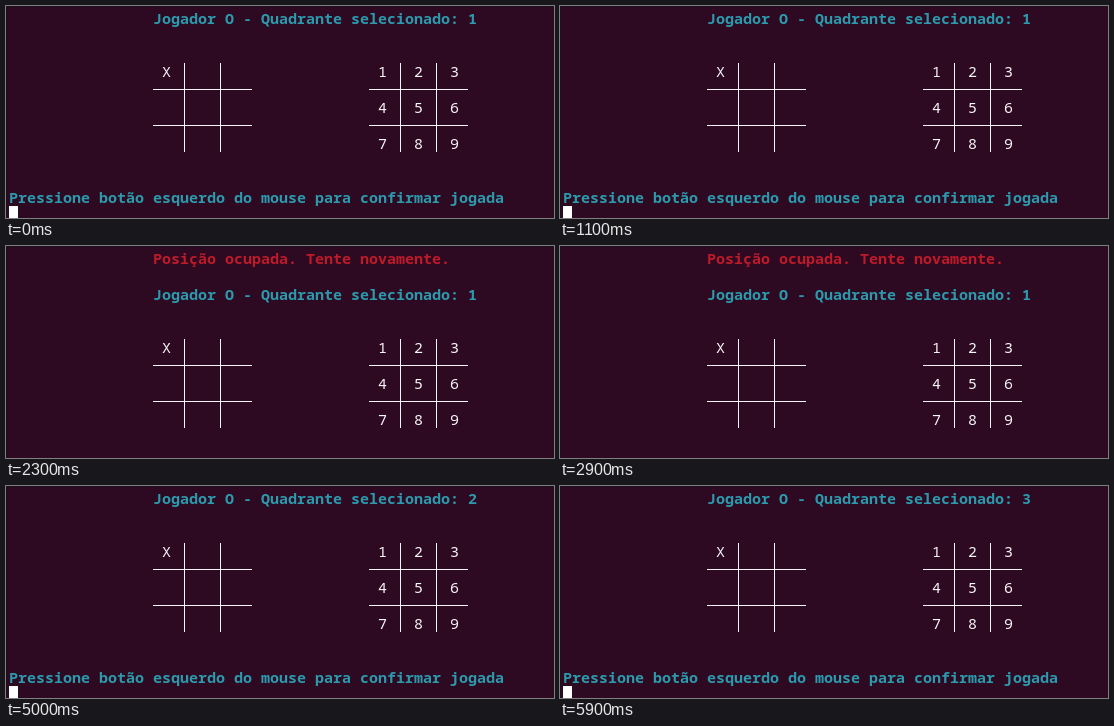
Write an HTML page with a canvas that moves like this. It is 548 by 212 pixels and loops after 6800 ms.

```html
<!DOCTYPE html>
<html lang="pt">
<head>
<meta charset="utf-8">
<title>Jogo da velha</title>
<style>
html, body { margin: 0; width: 100%; height: 100%; overflow: hidden; background: #2d0922; }
canvas { display: block; }
</style>
</head>
<body>
<canvas id="stage" width="548" height="212"></canvas>
<script>
const ctx = document.getElementById('stage').getContext('2d');
const LOOP = 6800, CELL = 9, ROW = 18, LEFT = 3, TOP = 2;
const BASELINE = 18.25, LEADING = 17.9;
const FONT = '15px "Noto Sans Mono", "DejaVu Sans Mono", monospace';
const BG = '#2d0922', EDGE = '#20101d', CYAN = '#2c9aac', RED = '#bd1b29', WHITE = '#f8f6f7';
const BLINK = 600, FIRST_OFF = 500;
const REJECTED = 2300, RETRY = 5000, MOVED = 5600;

const colX = col => LEFT + col * CELL;

function box(color, x, y, w, h) {
  ctx.fillStyle = color;
  ctx.fillRect(x, y, w, h);
}

function print(text, col, row, color, weight) {
  ctx.font = weight + ' ' + FONT;
  ctx.fillStyle = color;
  ctx.fillText(text, colX(col), Math.floor(BASELINE + row * LEADING));
}

function board(col, row, marks) {
  const x = colX(col), y = TOP + row * ROW;
  for (const i of [0, 1]) {
    box(WHITE, x + 31 + i * 36, y + 1, 1, 89);
    box(WHITE, x, y + 27 + i * 36, 99, 1);
  }
  [...marks].forEach((mark, i) =>
    print(mark, col + 1 + (i % 3) * 4, row + 2 * Math.floor(i / 3), WHITE, 500));
}

function cursorOn(t) {
  if (t >= RETRY && t < RETRY + 300) return true;
  return Math.floor((t - FIRST_OFF) / BLINK) % 2 !== 0;
}

function draw(t) {
  const rejected = t >= REJECTED && t < RETRY;
  const head = rejected ? 2 : 0;
  const quadrant = t >= MOVED ? 3 : t >= RETRY ? 2 : 1;

  box(BG, 0, 0, 548, 212);
  box(EDGE, 0, 0, 548, 1);
  box(EDGE, 0, 0, 1, 212);

  if (rejected) print('Posição ocupada. Tente novamente.', 16, 0, RED, 700);
  print('Jogador O - Quadrante selecionado: ' + quadrant, 16, head, CYAN, 700);
  board(16, head + 3, 'X');
  board(40, head + 3, '123456789');

  if (!rejected) {
    print('Pressione botão esquerdo do mouse para confirmar jogada', 0, 10, CYAN, 700);
    if (cursorOn(t)) box('#ffffff', LEFT, 200, CELL, 12);
  }
}

const start = performance.now();
function tick() {
  draw((performance.now() - start) % LOOP);
  requestAnimationFrame(tick);
}
tick();
</script>
</body>
</html>
```
